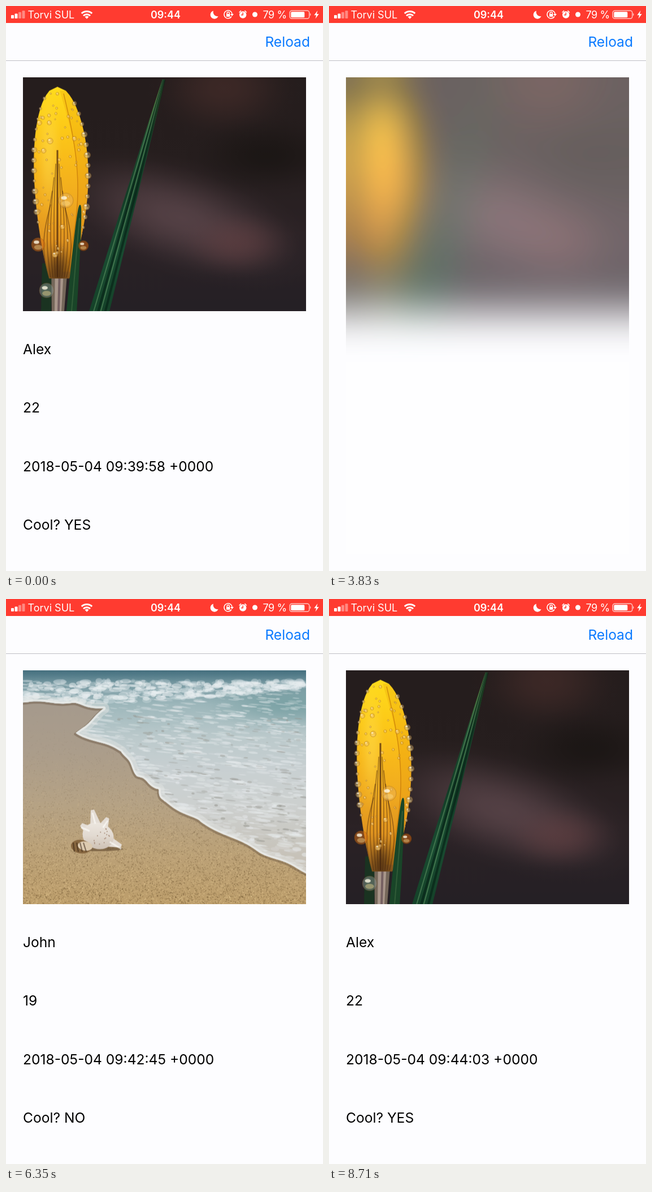
An HTML page with a canvas that plays this animation: 561x998 px, repeating every 8.81 s.

```html
<!DOCTYPE html>
<html lang="en">
<head>
<meta charset="utf-8">
<title>Reload</title>
<style>
  html, body { margin: 0; width: 100%; height: 100%; overflow: hidden; background: #fdfdff; }
  canvas, svg { position: absolute; left: 0; top: 0; width: 561px; height: 998px; display: block; }
  text { font-family: Inter, Roboto, sans-serif; font-size: 24.6px; white-space: pre; }
  .bar text { font-size: 18px; fill: #fff; }
  .line { fill: none; stroke: #fff; stroke-width: 1.5; }
</style>
</head>
<body>
<canvas id="stage" width="561" height="998"></canvas>
<svg viewBox="0 0 561 998">
  <rect width="561" height="30" fill="#ff3b30"/>
  <rect y="96" width="561" height="1" fill="#bfbfc4"/>
  <g class="bar" fill="#fff">
    <g id="signal"></g>
    <text x="38.5" y="22">Torvi SUL</text>
    <path class="line" style="stroke-width:3" d="M133.8 13.2a13.2 13.2 0 0 1 18.4 0M137 17.2a8.5 8.5 0 0 1 12 0"/>
    <path d="M143 22.8l-3.4-3.6a4.8 4.8 0 0 1 6.8 0z"/>
    <text x="282.5" y="22" text-anchor="middle" font-weight="600">09:44</text>
    <path d="M367 8.5a7.2 7.2 0 1 0 8.6 9.5a7.4 7.4 0 0 1-8.6-9.5z"/>
    <path class="line" d="M399 18.5a7 7 0 1 1 1-4M391.2 14v-1.5a2 2 0 0 1 4 0v1.5"/>
    <path d="M397 14h6l-3 4zM390 14h6.4v5h-6.4z"/>
    <circle cx="419.2" cy="15.5" r="6.2"/>
    <path class="line" d="M412.6 11.5l3.4-3.4M425.8 11.5l-3.4-3.4"/>
    <path class="line" style="stroke:#ff3b30" d="M419.2 11.5v4.3h-3.2"/>
    <circle cx="440.5" cy="15" r="4.5"/>
    <text x="454.5" y="22" letter-spacing="-.4">79 %</text>
    <rect class="line" x="502.2" y="8.2" width="34.5" height="14" rx="3.5" opacity=".7"/>
    <rect x="504.3" y="10.2" width="24" height="10" rx="1.5"/>
    <path d="M538 12.6a2.8 2.8 0 0 1 0 5z" opacity=".7"/>
    <path d="M551.5 8l-6.2 8.2h3.8l-1.6 6.3l6.2-8.5h-3.8z"/>
  </g>
  <text id="reload" x="538" y="72" text-anchor="end" fill="#0a7aff">Reload</text>
  <g id="rows"></g>
</svg>
<script>
const LOOP = 8810, BG = '#fdfdff';
const X = 30, Y = 126, W = 501, H = 414, PANEL = 842;   // picture cell and frosted panel
const PT = 561 / 375;                                   // screen points to pixels
const el = id => document.getElementById(id);
const ctx = el('stage').getContext('2d');

const people = [
  ['Alex', '22', '2018-05-04 09:39:58 +0000', 'Cool? YES'],
  ['John', '19', '2018-05-04 09:42:45 +0000', 'Cool? NO'],
  ['Alex', '22', '2018-05-04 09:44:03 +0000', 'Cool? YES']
];

function addSvg(parent, tag, attrs) {
  const node = document.createElementNS('http://www.w3.org/2000/svg', tag);
  for (const k in attrs) node.setAttribute(k, attrs[k]);
  return parent.appendChild(node);
}

const rows = people[0].map((_, i) => addSvg(el('rows'), 'text', { x: 30, y: 615 + i * 103.4 }));
for (let i = 0; i < 4; i++) {
  const h = 6 + i * 2.6;
  addSvg(el('signal'), 'rect', { x: 9 + i * 6.5, y: 22 - h, width: 5, height: h, rx: 1, opacity: i < 2 ? 1 : .4 });
}

function makeCanvas(w, h) {
  const cv = document.createElement('canvas');
  cv.width = w;
  cv.height = h;
  return cv.getContext('2d');
}

function seeded(s) {
  return () => (s = (s * 16807) % 2147483647) / 2147483647;
}

function ramp(c, y0, y1, ...colors) {
  const g = c.createLinearGradient(0, y0, 0, y1);
  colors.forEach((k, i) => g.addColorStop(i / (colors.length - 1), k));
  return g;
}

function trace(c, pts) {
  c.beginPath();
  pts.forEach(p => c.lineTo(...p));
}

function shape(c, pts, fill) {
  trace(c, pts);
  c.fillStyle = fill;
  c.fill();
}

function stroke(c, pts, color, width) {
  trace(c, pts);
  c.strokeStyle = color;
  c.lineWidth = width;
  c.stroke();
}

// Samples f(u) for u from 0 to 1.
const sample = (f, n = 48) => Array.from({ length: n + 1 }, (_, i) => f(i / n));

// Upright band from y0 to y1, given its middle and half width along the way.
function band(y0, y1, mid, half) {
  const side = s => sample(u => [mid(u) + s * half(u), y0 + (y1 - y0) * u]);
  return [...side(-1), ...side(1).reverse()];
}

function oval(c, x, y, rx, ry, fill, turn = 0) {
  c.beginPath();
  c.ellipse(x, y, rx, ry, turn, 0, 7);
  c.fillStyle = fill;
  c.fill();
}

function glow(c, x, y, rx, ry, rgb, a, turn = 0) {
  c.save();
  c.translate(x, y);
  c.rotate(turn);
  c.scale(rx, ry);
  const g = c.createRadialGradient(0, 0, 0, 0, 0, 1);
  for (let i = 0; i <= 6; i++) g.addColorStop(i / 6, `rgba(${rgb},${a * Math.cos(i / 12 * Math.PI) ** 2})`);
  c.fillStyle = g;
  c.fillRect(-1, -1, 2, 2);
  c.restore();
}

function drop(c, x, y, r, tone = '235,180,85') {
  oval(c, x, y, r, r, `rgba(${tone},.5)`);
  c.strokeStyle = 'rgba(120,70,15,.4)';
  c.lineWidth = .8;
  c.stroke();
  oval(c, x, y + r * .4, r * .6, r * .35, 'rgba(255,228,150,.4)');
  oval(c, x - r * .25, y - r * .35, r * .4, r * .25, 'rgba(255,250,230,.8)');
}

function drawFlower(c) {
  const rnd = seeded(37);
  c.fillStyle = ramp(c, Y, Y + H, '#251d1d', '#261e1e', '#2b2225', '#252025');
  c.fillRect(X, Y, W, H);
  glow(c, 385, 145, 140, 95, '72,46,43', .65);
  glow(c, 310, 375, 260, 105, '94,72,77', .8, .32);
  glow(c, 410, 420, 110, 65, '104,66,68', .5);
  glow(c, 460, 265, 150, 75, '24,20,18', .7);

  const leafMid = u => 279 - 114 * u, leafHalf = u => 2 + 16 * u ** .85;
  shape(c, band(130, 540, leafMid, leafHalf), ramp(c, 130, 540, '#5d7b38', '#1f4d31', '#133d27', '#194b31', '#154229'));
  const ribs = [-.55, -.1, .15, .6];
  ribs.forEach((k, i) => stroke(c,
    sample(u => [leafMid(u) + k * leafHalf(u), 130 + 410 * u]),
    i % 2 ? 'rgba(7,34,22,.65)' : 'rgba(92,145,98,.6)', i % 2 ? 4 : 2));

  shape(c, band(455, 540, u => 73 - 2 * u, () => 9), '#1a3321');
  shape(c, band(450, 540, u => 95 - 3 * u, u => 15 - 4 * u), '#75675a');
  shape(c, band(450, 540, u => 95 - 3 * u, u => 8 - 2 * u), '#a8968a');
  stroke(c, [[95, 465], [93, 540]], 'rgba(85,62,72,.6)', 4);

  const mid = u => 91 + 7 * Math.sin(Math.PI * u * .85);
  const half = u => 48 * Math.max(0, Math.sin(Math.PI * .93 * u ** .75)) ** .65;
  const petal = band(143, 482, mid, half);
  shape(c, petal, ramp(c, 143, 482, '#ffdc1c', '#fdcb18', '#f8b91a', '#f0aa20', '#df931f', '#8d5b20'));
  c.save();
  c.clip();
  shape(c, band(150, 470, u => 112 + 32 * Math.sin(u * 3), () => 17), 'rgba(222,140,4,.22)');
  glow(c, 76, 260, 26, 130, '255,224,85', .45);
  stroke(c, sample(u => [102 + 25 * Math.sin(u * 2.8), 155 + 300 * u]), 'rgba(180,100,5,.55)', 1.5);
  // veins run together towards the stem
  for (let i = -4; i <= 4; i++) {
    const top = 255 + Math.abs(i) * 24;
    stroke(c, sample(u => [91 + i * (3 + 3 * Math.sin(u * 2.8)), top + (480 - top) * u]),
      `rgba(80,42,12,${i ? .5 : .75})`, i ? 1.6 : 3);
  }
  glow(c, 93, 470, 30, 55, '60,35,15', .55);
  for (let i = 0; i < 70; i++) drop(c, 54 + rnd() * 90, 155 + rnd() * 285, 1 + rnd() * rnd() * 5);
  c.restore();

  shape(c, band(352, 540, u => 131 - 15 * u, u => 1 + 9 * Math.sqrt(u) * (1 - .1 * u)), '#194528');
  stroke(c, sample(u => [130 - 14 * u, 375 + 165 * u]), 'rgba(85,125,80,.4)', 2);

  // beads along both rims
  for (let i = 0; i < 26; i++) {
    const u = .06 + .7 * i / 26, side = i % 2 ? 1 : -1;
    drop(c, mid(u) + side * half(u), 143 + 339 * u, 2 + rnd() * 4.5, '190,160,105');
  }
  drop(c, 106, 344, 13);
  drop(c, 57, 422, 12, '215,110,20');
  drop(c, 137, 424, 9, '215,100,10');
  drop(c, 72, 503, 13, '135,145,140');
}

function drawBeach(c) {
  const rnd = seeded(91);
  c.fillStyle = ramp(c, 180, Y + H, '#a59a8d', '#ab9d8b', '#b5a285', '#bba177', '#bd9e6b');
  c.fillRect(X, Y, W, H);
  for (let i = 0; i < 12000; i++) {
    const k = Math.sqrt(rnd()), x = X + rnd() * W, y = 180 + k * 360;
    c.fillStyle = rnd() < .5 ? `rgba(70,48,20,${k * .34})` : `rgba(245,218,165,${k * .38})`;
    c.fillRect(x, y, 1 + k * .6, 1 + k * .4);
  }

  // shoreline through a few points, with small scallops
  const keys = [[28, 182], [115, 184], [172, 195], [124, 238], [205, 269], [232, 312], [268, 336], [278, 358], [345, 395], [450, 448], [536, 486]];
  const shore = sample(u => {
    const p = Math.min(u * (keys.length - 1), keys.length - 1.001), i = Math.floor(p), k = p - i;
    const s = k * k * (3 - 2 * k) * .4 + k * .6;
    return [0, 1].map(j => keys[i][j] + (keys[i + 1][j] - keys[i][j]) * s + Math.sin(u * 75 + j * 2) * 1.5);
  }, 150);
  c.lineJoin = 'round';
  stroke(c, shore.map(([x, y]) => [x - 1, y + 2]), 'rgba(105,86,64,.45)', 4);
  shape(c, [...shore, [540, 120], [20, 120]], ramp(c, 126, 486, '#5d8490', '#9db7bb', '#bccacc', '#c9d0d2', '#cdd0cf', '#c9c7c0', '#c6beb2'));
  c.save();
  c.clip();
  glow(c, 500, 188, 170, 50, '112,155,158', .7);
  for (let i = 0; i < 1500; i++) {
    const k = rnd(), y = 150 + k * 330;
    oval(c, X + rnd() * W, y, 3 + rnd() * 12, .7 + rnd() * (1 + k * 2), `rgba(232,236,238,${.15 + rnd() * .35})`, .1);
  }
  for (let i = 0; i < 260; i++) {
    const k = rnd();
    oval(c, 190 + rnd() * 345, 205 + k * 230, 2 + rnd() * 8, .6 + rnd() * 1.5, `rgba(150,150,143,${.2 + rnd() * .35})`, .1);
  }
  // breaking wave, strongest on the left
  for (let i = 0; i < 420; i++) {
    const k = rnd(), x = X + k * W, tall = 40 * (1 - k) ** .6 + 8;
    oval(c, x, 144 + rnd() * tall, 3 + rnd() * 9, 1.5 + rnd() * 3.5, `rgba(232,238,240,${.2 + rnd() * .45})`);
  }
  c.fillStyle = ramp(c, 126, 148, '#46707f', 'rgba(75,119,134,0)');
  c.fillRect(X, Y, W, 22);
  stroke(c, shore, 'rgba(226,228,227,.45)', 20);
  stroke(c, shore, 'rgba(236,237,234,.8)', 7);
  c.restore();

  // shell: a rounded body with spikes
  oval(c, 165, 442, 42, 4, 'rgba(77,53,28,.5)');
  const tips = [[133, 399], [153, 373], [180, 387], [204, 437]];
  tips.forEach(([x, y]) => {
    const a = Math.atan2(y - 422, x - 163), dx = Math.sin(a) * 15, dy = Math.cos(a) * 15;
    shape(c, [[163 + dx, 422 - dy], [x + dx * .2, y - dy * .2], [x - dx * .2, y + dy * .2], [163 - dx, 422 + dy]], '#e4ddd5');
  });
  oval(c, 163, 419, 28, 23, ramp(c, 395, 442, '#ece6df', '#e2dad1', '#cfc2b5'), .3);
  tips.forEach(([x, y]) => stroke(c, [[x, y + 5], [(x + 163) / 2, (y + 422) / 2]], 'rgba(255,255,252,.6)', 3));
  oval(c, 133, 438, 18, 12, '#86663f', .15);
  oval(c, 140, 437, 13, 8, '#dccab0', .15);
  for (let i = 0; i < 4; i++) stroke(c, [[119 + i * 6, 431], [121 + i * 7, 447]], 'rgba(50,30,14,.55)', 2);
  for (let i = 0; i < 16; i++) oval(c, 152 + rnd() * 32, 402 + rnd() * 32, 1, 1, '#a88d7a');
}

// Returns the sharp picture and the frosted panel that covers it and the rows.
function makePhoto(draw) {
  const pic = makeCanvas(W, H), pad = 120;
  pic.translate(-X, -Y);
  draw(pic);
  const wide = makeCanvas(W + 2 * pad, PANEL + 2 * pad);
  wide.fillStyle = BG;
  wide.fillRect(0, 0, W + 2 * pad, PANEL + 2 * pad);
  // mirrored copies keep the edges from fading
  wide.translate(pad, pad);
  for (const x of [-1, 0, 1]) {
    for (const flip of [1, -1]) {
      wide.save();
      wide.translate(x > 0 ? 2 * W : 0, 0);
      wide.scale(x ? -1 : 1, flip);
      wide.drawImage(pic.canvas, 0, 0);
      wide.restore();
    }
  }
  const frost = makeCanvas(W, PANEL);
  frost.filter = 'blur(37px) saturate(1.7)';
  frost.drawImage(wide.canvas, -pad, -pad);
  frost.filter = 'none';
  frost.fillStyle = 'rgba(255,255,255,.3)';
  frost.fillRect(0, 0, W, PANEL);
  return { pic: pic.canvas, frost: frost.canvas };
}

const flower = makePhoto(drawFlower), beach = makePhoto(drawBeach);

const clamp = v => Math.min(1, Math.max(0, v));
const ease = (t, start) => { const p = clamp((t - start) / 400); return p * p * (3 - 2 * p); };
const cover = t => ease(t, 2080) - ease(t, 3875) + ease(t, 6460) - ease(t, 8190);
const tap = (t, at) => t < at ? 1 : .2 + .8 * clamp((t - at - 60) / 340);

function spinner(t, alpha) {
  const head = Math.floor(t * 12 / 1000) + 1;
  ctx.save();
  ctx.translate(280.5, 546.5);
  ctx.lineWidth = 2.8;
  ctx.lineCap = 'round';
  for (let i = 0; i < 12; i++) {
    const age = (head - i + 1200) % 12;
    ctx.strokeStyle = `rgba(62,62,62,${alpha * Math.max(.18, .7 - age * .075)})`;
    ctx.beginPath();
    ctx.moveTo(0, -8);
    ctx.lineTo(0, -13.5);
    ctx.stroke();
    ctx.rotate(Math.PI / 6);
  }
  ctx.restore();
}

function render(t) {
  const a = cover(t);
  const photo = t >= 4470 && t < 8710 ? beach : flower;
  const left = 20 * PT, top = 84 * PT, wide = 335 * PT;
  ctx.fillStyle = BG;
  ctx.fillRect(0, 0, 561, 998);
  ctx.drawImage(photo.pic, left, top, wide, 276.5 * PT);
  if (a > 0) {
    ctx.globalAlpha = a;
    ctx.drawImage(photo.frost, left, top, wide, 563 * PT);
    ctx.globalAlpha = 1;
    if (t < 3830 || (t > 6400 && t < 8200)) spinner(t, a);
  }
  const who = people[t < 3700 ? 0 : t < 8000 ? 1 : 2];
  rows.forEach((r, i) => { if (r.textContent !== who[i]) r.textContent = who[i]; });
  el('rows').setAttribute('opacity', 1 - a);
  el('reload').setAttribute('opacity', Math.min(tap(t, 2000), t < 6000 ? 1 : tap(t, 6371)));
}

const began = performance.now();
function tick() {
  render((performance.now() - began) % LOOP);
  requestAnimationFrame(tick);
}
tick();
</script>
</body>
</html>
```
